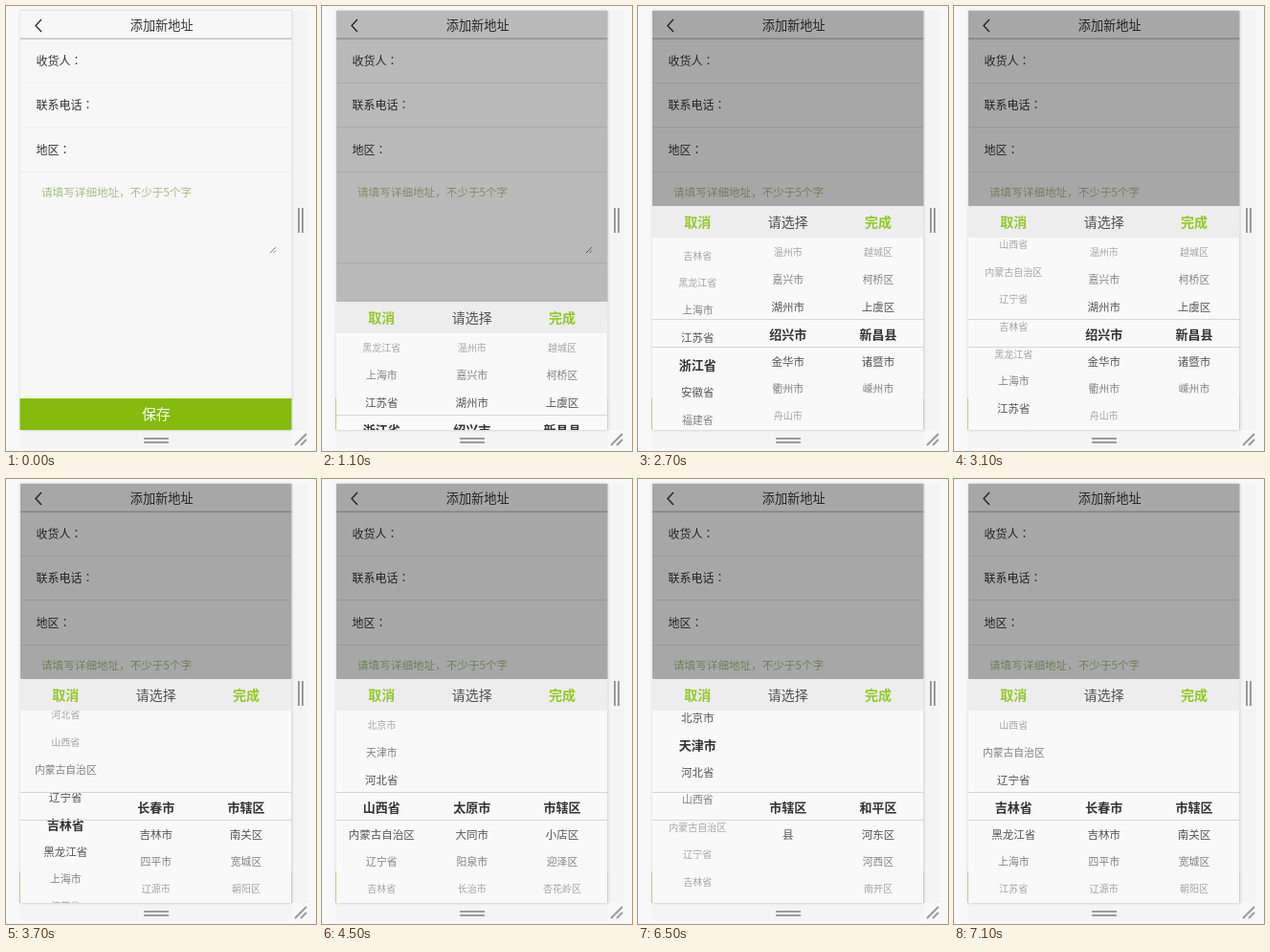
Animation of 324x465 px, one loop 8000 ms. Source, as an HTML page:

```html
<!DOCTYPE html>
<html lang="zh-CN">
<head>
<meta charset="utf-8">
<title>添加新地址</title>
<style>
  html, body { margin: 0; width: 100%; height: 100%; overflow: hidden; background: #f8f8f8; }
  #stage { display: block; width: 324px; height: 465px; }
  text { font-family: "Noto Sans CJK SC", "Noto Sans CJK", "Noto Sans", sans-serif; }
  .mid { text-anchor: middle; }
  .colon { font-family: "Noto Sans CJK JP", "Noto Sans CJK", sans-serif; }
  .grip { stroke: #9b9b9b; stroke-width: 2; fill: none; }
  .rule { stroke: #f3f3f3; }
  .rule.area { stroke: #ededed; }
  .dim .rule { stroke: #e4e4e4; }
</style>
</head>
<body>
<svg id="stage" viewBox="0 0 324 465">
  <defs>
    <filter id="soft" x="-10%" y="-10%" width="120%" height="120%"><feGaussianBlur stdDeviation="1.5"/></filter>
    <linearGradient id="fade" x1="0" y1="0" x2="0" y2="1">
      <stop offset="0" stop-color="#f2f2f2"/>
      <stop offset=".12" stop-color="#f9f9f9"/>
      <stop offset="1" stop-color="#f9f9f9"/>
    </linearGradient>
  </defs>

  <rect width="324" height="465" fill="#f8f8f8"/>
  <path d="M299 5h17v438h-17zM15 443h284v19h-284z" fill="#f4f4f4"/>
  <rect x="15" y="5" width="283.5" height="438" fill="#000" opacity=".22" filter="url(#soft)"/>
  <path class="grip" d="M306 211v26M310 211v26M144 452h26M144 456h26M302 459l12-12M308 459l6-6"/>

  <svg x="14" y="5" width="285" height="438" viewBox="14 5 285 438">
    <g id="form">
      <rect x="14.500" y="5" width="284" height="438" fill="#f7f7f7"/>
      <path d="M15 33.5h283.500" stroke="#dadada"/>
      <path d="M15 34.5h283.500" stroke="#c6c6c6"/>
      <path d="M37 14l-6 6.5l6 6.5" fill="none" stroke="#333" stroke-width="1.4"/>
      <path class="rule" d="M15 80.5h283.500M15 126.5h283.500M15 268.5h283.500"/>
      <path class="rule area" d="M15 173.5h283.500"/>
      <path d="M276 258l6-6M279.500 258l2.500-2.500" stroke="#808080"/>
      <rect x="14.500" y="410" width="284" height="33" fill="#84bb0e"/>
    </g>
    <rect id="shade" x="15" y="5" width="283.500" height="438" fill="#000"/>
    <g id="sheet">
      <rect x="15" y="209" width="283.500" height="234" fill="url(#fade)"/>
      <rect x="15" y="209" width="283.500" height="33" fill="#ededed"/>
      <svg x="15" y="242" width="284" height="201" viewBox="15 242 284 201"><g id="wheels"></g></svg>
      <path d="M15 327.500h283.500M15 356.500h283.500" stroke="#d6d6d6"/>
    </g>
  </svg>
</svg>

<script>
const NS = "http://www.w3.org/2000/svg";
const [form, shade, sheet, wheels] =
  ["form", "shade", "sheet", "wheels"].map(id => document.getElementById(id));

const LOOP = 8000, STEP = 100, ROW = 28.6, MID = 342.8;
const COLS = [62.3, 156.8, 251];

// size, colour and weight by distance from the chosen row
const LOOKS = [
  [13, "#333", 700],
  [11.5, "#555", 400],
  [10.8, "#808080", 400],
  [10, "#a4a4a4", 400]
];

const words = s => s.split(" ");
const provinces = words("北京市 天津市 河北省 山西省 内蒙古自治区 辽宁省 吉林省 黑龙江省 上海市 江苏省 浙江省 安徽省 福建省 江西省 山东省");

// province index: cities, districts, chosen row in both
const places = {
  1: [words("市辖区 县"), words("和平区 河东区 河西区 南开区"), 0],
  3: [words("太原市 大同市 阳泉市 长治市"), words("市辖区 小店区 迎泽区 杏花岭区"), 0],
  6: [words("长春市 吉林市 四平市 辽源市"), words("市辖区 南关区 宽城区 朝阳区"), 0],
  10: [words("温州市 嘉兴市 湖州市 绍兴市 金华市 衢州市 舟山市"),
       words("越城区 柯桥区 上虞区 新昌县 诸暨市 嵊州市"), 3]
};

// start time, steps, first row, last row, ease-out power
const moves = [
  [2700, 7, 10, 6, 2.16],
  [3700, 9, 6, 3, 2],
  [4900, 8, 3, 1, 2],
  [6500, 7, 1, 6, 3.9]
];

// start time, sheet offset, shade opacity
const rises = [
  [0, 240, 0],
  [1100, 100, 0.25],
  [1200, 22, 0.31],
  [1300, 0, 0.325]
];

function label(parent, str, x, cy, size, fill, weight = 400, cls = "mid") {
  const el = document.createElementNS(NS, "text");
  el.textContent = str;
  el.setAttribute("class", cls);
  el.setAttribute("x", x);
  el.setAttribute("y", cy + size * 0.38);
  el.setAttribute("font-size", size);
  el.setAttribute("font-weight", weight);
  el.setAttribute("fill", fill);
  parent.append(el);
}

function field(name, cy) {
  const x = 31.5, size = 12;
  label(form, name, x, cy, size, "#333", 400, "");
  label(form, "：", x + name.length * size, cy, size, "#333", 400, "colon");
}

function wheel(x, list, pos, chosen) {
  list.forEach((name, i) => {
    const y = MID + (i - pos) * ROW;
    if (Math.abs(y - MID) > 118) return;
    const look = LOOKS[Math.min(3, Math.abs(i - chosen))];
    label(wheels, name, x, y, ...look);
  });
}

function scrollAt(t) {
  let pos = 10, chosen = 10;
  for (const [start, count, from, to, power] of moves) {
    if (t < start) break;
    const k = Math.floor((t - start) / STEP) + 1;
    const done = k >= count;
    pos = done ? to : from + (to - from) * (1 - (1 - k / count) ** power);
    chosen = done ? to : from;
  }
  return [pos, chosen];
}

function draw(t) {
  const [, drop, dark] = rises.filter(r => r[0] <= t).pop();
  shade.setAttribute("opacity", dark);
  sheet.setAttribute("transform", `translate(0 ${drop})`);
  form.setAttribute("class", dark ? "dim" : "");

  const [pos, chosen] = scrollAt(t);
  const [cities, districts, row] = places[chosen];
  wheels.replaceChildren();
  wheel(COLS[0], provinces, pos, chosen);
  wheel(COLS[1], cities, row, row);
  wheel(COLS[2], districts, row, row);
}

label(form, "添加新地址", 162.7, 20, 13.2, "#333");
field("收货人", 57.5);
field("联系电话", 103.5);
field("地区", 150.5);
label(form, "请填写详细地址，不少于5个字", 37, 195, 11.6, "#a6bf86", 400, "");
label(form, "保存", 157, 426.5, 15, "#fff", 500);
label(sheet, "取消", COLS[0], 226, 14, "#93c92a", 700);
label(sheet, "请选择", COLS[1], 226, 14, "#505050", 500);
label(sheet, "完成", COLS[2], 226, 14, "#93c92a", 700);

const began = performance.now();
let last = -1;

function tick() {
  const t = Math.max(0, performance.now() - began) % LOOP;
  const step = Math.floor(t / STEP);
  if (step !== last) draw(step * STEP);
  last = step;
  requestAnimationFrame(tick);
}
tick();
</script>
</body>
</html>
```
